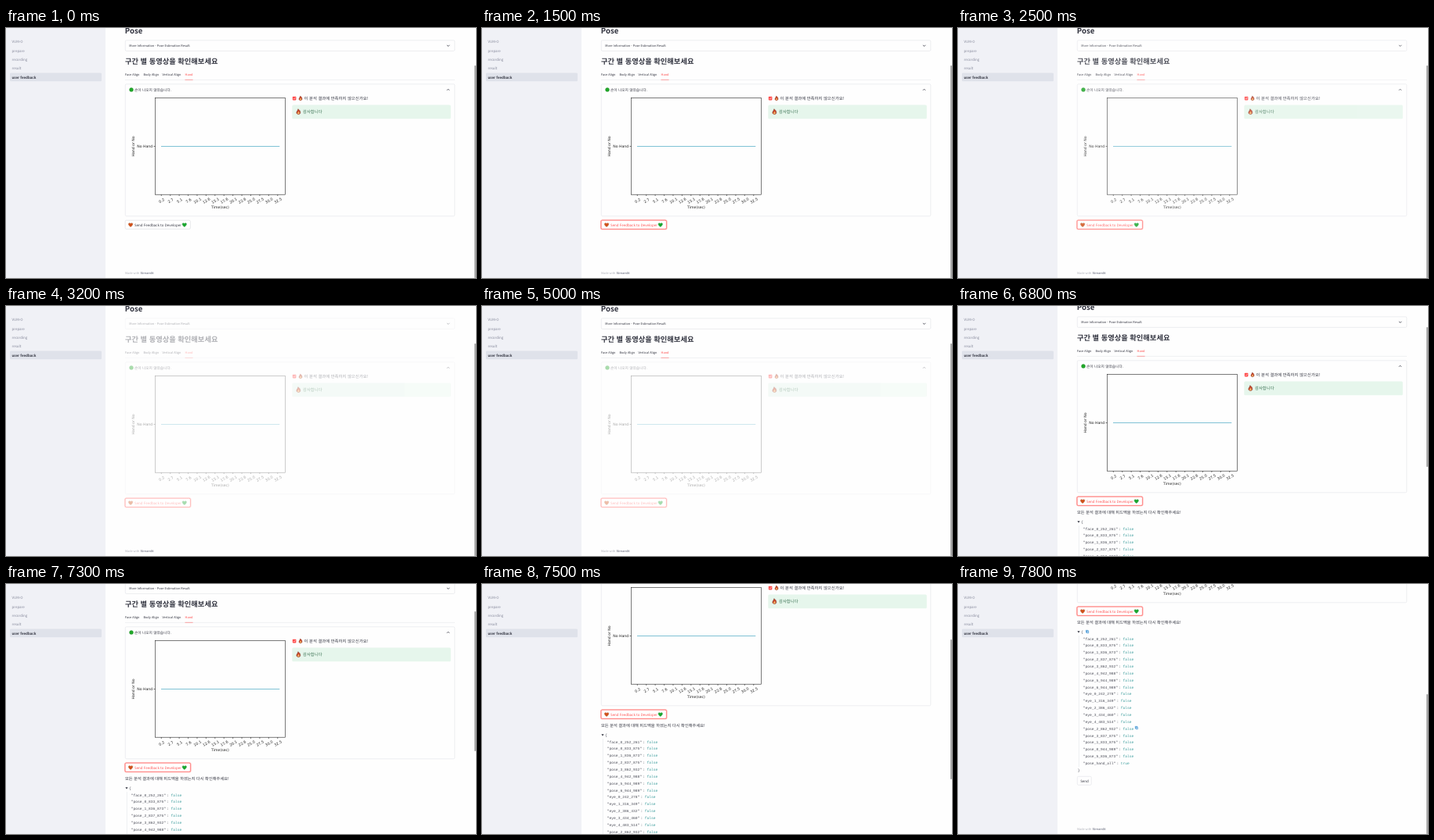
An HTML page that plays this animation: 600x320 px, repeating every 8000 ms.

```html
<!DOCTYPE html>
<html lang="ko">
<head>
<meta charset="utf-8">
<title>Feedback</title>
<style>
  html, body { margin: 0; width: 600px; height: 320px; overflow: hidden; background: #fefefe; }
  svg { display: block; width: 600px; height: 320px; }
  text {
    font-family: "Noto Sans CJK KR", "Noto Sans CJK", "Noto Sans", sans-serif;
    fill: #31333f; text-rendering: geometricPrecision; white-space: pre;
  }
  .plot text { font: 4.65px "DejaVu Sans", sans-serif; fill: #222; }
  .json text { font: 4.62px "Liberation Mono", "Noto Sans Mono", monospace; fill: #4a4c57; }
</style>
</head>
<body>
<svg id="stage" viewBox="0 0 600 320"></svg>
<script>
const LOOP = 8000, STEP = 100;
const RED = '#ff4b4b', LINE = '#e6e7eb', INK = '#31333f';
const stage = document.getElementById('stage');

function add(parent, tag, attrs = {}, content) {
  const node = document.createElementNS('http://www.w3.org/2000/svg', tag);
  for (const k in attrs) node.setAttribute(k, attrs[k]);
  if (content !== undefined) node.textContent = content;
  parent.append(node);
  return node;
}
const group = (parent, attrs) => add(parent, 'g', attrs);
const rect = (parent, x, y, width, height, attrs) =>
  add(parent, 'rect', { x, y, width, height, ...attrs });
const path = (parent, d, attrs) => add(parent, 'path', { d, fill: 'none', ...attrs });
const label = (parent, x, y, size, content, attrs) =>
  add(parent, 'text', { x, y, 'font-size': size, ...attrs }, content);
const frame = (parent, x, y, w, h) =>
  rect(parent, x, y, w, h, { rx: 1.5, fill: 'none', stroke: LINE, 'stroke-width': .7 });
const chevron = (parent, y, dir) =>
  path(parent, `M562.9 ${y - dir * .8}l1.6 ${dir * 1.6}l1.6 ${-dir * 1.6}`, { stroke: INK, 'stroke-width': .8 });

function heart(parent, x, y, color, dark) {
  const g = group(parent, { transform: `translate(${x} ${y}) scale(.88)` });
  path(g, 'M0 3.1C-5.2 -.6 -2.7 -4 0 -1.7C2.7 -4 5.2 -.6 0 3.1Z', { fill: color, stroke: dark, 'stroke-width': .4 });
  path(g, 'M-1.9 -.9L0 .7L1.9 -.9', { stroke: dark, 'stroke-width': .5 });
}
function flame(parent, x, y, scale) {
  const g = group(parent, { transform: `translate(${x} ${y}) scale(${scale})` });
  path(g, 'M-.6 -4C1.6 -2.8 3 -.8 2.8 1.4C2.6 4.5 -2.7 4.5 -2.8 1.3C-2.8 -.7 -1 -1.2 -.6 -4Z', { fill: '#c8452a', stroke: '#6b2a1c', 'stroke-width': .5 });
  path(g, 'M.2 -.6C2 1 1.9 3.4 0 3.5C-1.9 3.4 -1.8 1.4 .2 -.6Z', { fill: '#f2b266' });
}
function copyIcon(parent, x, y) {
  const g = group(parent, { fill: '#d9ecfb', stroke: '#3a8fd0', 'stroke-width': .6 });
  rect(g, x - 1.6, y - 1.8, 2.6, 2.6);
  rect(g, x - .6, y - .8, 2.4, 2.6);
}

// Scrolling page
const page = group(stage);
label(page, 151.8, 6.8, 9.6, 'Pose', { 'font-weight': 700 });

const info = group(page);
frame(info, 152.3, 15.8, 420.5, 13.6);
label(info, 157.3, 24.2, 3.91, 'More Information - Pose Estimation Result');
chevron(info, 22.6, 1);

const title = group(page);
label(title, 152, 45.9, 9.25, '구간 별 동영상을 확인해보세요', { 'font-weight': 700 });

const tabs = group(page);
path(tabs, 'M152 66.4H573', { stroke: LINE, 'stroke-width': .6 });
[['Face Align', 152], ['Body Align', 175.4], ['Vertical Align', 199.4], ['Hand', 228.6]].forEach(([s, x], i) =>
  label(tabs, x, 61, 3.91, s, i === 3 ? { style: `fill:${RED}` } : {}));
path(tabs, 'M228.5 66.3H238.6', { stroke: RED, 'stroke-width': .5 });

const result = group(page);
frame(result, 152.3, 71.8, 420.5, 169);
add(result, 'circle', { cx: 160, cy: 79, r: 2.5, fill: '#22a82a', stroke: '#17801f', 'stroke-width': .3 });
label(result, 164, 80.8, 4.7, '손이 나오지 않았습니다.');
chevron(result, 79, -1);

// Plot
const plot = group(result, { class: 'plot' });
rect(plot, 190.5, 89.5, 166, 123.7, { fill: 'none', stroke: '#222', 'stroke-width': .6 });
path(plot, 'M198 151.5H349.3', { stroke: '#4aa9c4', 'stroke-width': .7 });
path(plot, 'M188.5 151.5H190.5', { stroke: '#222', 'stroke-width': .6 });
label(plot, 187.2, 153.4, 4.65, 'No Hand', { 'text-anchor': 'end' });
label(plot, 0, 0, 4.65, 'Hand or No', { 'text-anchor': 'middle', transform: 'translate(164 151.5) rotate(-90)' });
label(plot, 273.5, 231.4, 4.65, 'Time(sec)', { 'text-anchor': 'middle' });
for (let i = 0; i < 14; i++) {
  const x = 198.3 + i * 11.42;
  path(plot, `M${x} 213.2v1.8`, { stroke: '#222', 'stroke-width': .6 });
  const sec = (.17 + i * 2.487).toFixed(1);
  label(plot, 0, 1.7, 4.65, sec, { 'text-anchor': 'middle', transform: `translate(${x + .4} 221) rotate(-30)` });
}

// Answer
const check = group(page);
rect(check, 365.8, 87.8, 4.6, 4.6, { rx: .8, fill: RED });
path(check, 'M366.8 90.1l1 1l1.7 -2', { stroke: '#fff', 'stroke-width': .6 });
flame(check, 376, 90, .72);
label(check, 380.6, 92.1, 5.36, '이 분석 결과에 만족하지 않으신가요!');

const thanks = group(page);
rect(thanks, 365.3, 98.4, 202.5, 17.8, { rx: 1.5, fill: '#e6f6ec' });
flame(thanks, 373.3, 107.2, .88);
label(thanks, 379, 109.3, 5.35, '감사합니다', { style: 'fill:#3d7354' });

// Feedback button
const ring = rect(page, 151.7, 245.8, 84.2, 11.9, { rx: 1.9, fill: 'none', stroke: '#ffb3b0', 'stroke-width': 1.3 });
const edge = rect(page, 152.2, 246.2, 83.2, 11.1, { rx: 1.5, fill: '#fff', 'stroke-width': .6 });
const button = group(page);
heart(button, 159.1, 251.8, '#e5591f', '#7c3a16');
heart(button, 227.8, 251.8, '#20b534', '#0c7020');
const caption = label(button, 164, 253.5, 4.47, 'Send Feedback to Developer');

// Summary
const summary = group(page);
label(summary, 152, 268, 5.26, '모든 분석 결과에 대해 피드백을 하셨는지 다시 확인해주세요!');
const json = group(summary, { class: 'json' });
path(json, 'M152.4 277.3h3.2l-1.6 2.2z', { fill: INK });
path(json, 'M154.4 283V451', { stroke: '#e3e4e8', 'stroke-width': .6 });
label(json, 157, 280, 4.62, '{', { 'font-weight': 700 });
label(json, 152.8, 456.6, 4.62, '}', { 'font-weight': 700 });
const keys = `face_0_252_261 pose_0_833_875 pose_1_836_873 pose_2_837_875 pose_3_862_932
  pose_4_942_988 pose_5_944_989 pose_6_944_989 eye_0_242_278 eye_1_316_349 eye_2_386_432
  eye_3_434_460 eye_4_483_514 pose_2_862_932 pose_3_837_875 pose_1_833_875 pose_0_944_989
  pose_5_836_873 pose_hand_all`.split(/\s+/);
keys.forEach((key, i) => {
  const y = 288.5 + i * 8.86, end = 159.8 + (key.length + 2) * 2.772;
  label(json, 159.8, y, 4.62, `"${key}"`);
  label(json, end + 1, y, 4.62, ':');
  label(json, end + 6.3, y, 4.62, key === 'pose_hand_all' ? 'true' : 'false', { style: 'fill:#3a9c9c' });
});
frame(summary, 152.3, 463.3, 18, 11);
label(summary, 156.2, 470.5, 4.47, 'Send');
const icons = group(summary);
copyIcon(icons, 165, 278);
copyIcon(icons, 227.8, 401);

const footer = label(page, 152, 314.7, 3.75, 'Made with ', { style: 'fill:#b0b2ba' });
add(footer, 'tspan', { style: 'fill:#8a8d9b', 'font-weight': 700 }, 'Streamlit');

// Fixed parts
rect(stage, 0, 0, 127, 320, { fill: '#f0f1f6' });
rect(stage, 5, 57.6, 117, 10.6, { rx: 1.2, fill: '#dfe2ea' });
['VUM-O', 'prepare', 'recording', 'result', 'user feedback'].forEach((s, i) => {
  const on = i === 4;
  label(stage, 7.5, 19.4 + i * 11.33, 4.45, s, { style: `fill:${on ? INK : '#85889a'}`, 'font-weight': on ? 700 : 400 });
});
const thumb = rect(stage, 598.2, 48, 1.5, 272, { rx: .7, fill: '#8c8c8c' });

// Timing
const HOVER = 600, FOCUS = 1300, FADE = 2000, LIST = 6800, ICONS = 7700;
const scroll = [2, 4, 6, 9, 13, 17, 40, 85, 140, 190, 217];
const restored = [[info, 3700], [title, 3800], [tabs, 4000], [result, 5500], [check, 5500], [thanks, 6000], [button, 6000]];
const show = (node, on) => node.setAttribute('visibility', on ? 'visible' : 'hidden');

function stale(t, until, low) {
  if (t < FADE || t >= until) return 1;
  return 1 - (1 - low) * Math.min(1, (t - FADE) / 1100) ** 1.7;
}

function draw(t) {
  const listed = t >= LIST, hot = t >= HOVER;
  const d = listed ? scroll[Math.min(scroll.length - 1, (t - LIST) / STEP)] : 0;
  page.setAttribute('transform', `translate(0 ${-d})`);
  thumb.setAttribute('y', listed ? 26 + d * .53 : 48);
  thumb.setAttribute('height', listed ? 179 : 272);
  footer.setAttribute('y', listed ? 531.7 : 314.7);
  show(summary, listed);
  show(icons, t >= ICONS);
  show(ring, t >= FOCUS);
  for (const [node, until] of restored) node.setAttribute('opacity', stale(t, until, .38));
  ring.setAttribute('opacity', stale(t, 6000, .38));
  edge.setAttribute('stroke', hot ? RED : '#d9dae0');
  edge.setAttribute('stroke-opacity', stale(t, 6000, .55));
  caption.style.fill = hot ? RED : INK;
}

function tick() {
  draw(Math.floor(performance.now() % LOOP / STEP) * STEP);
  requestAnimationFrame(tick);
}
tick();
</script>
</body>
</html>
```
